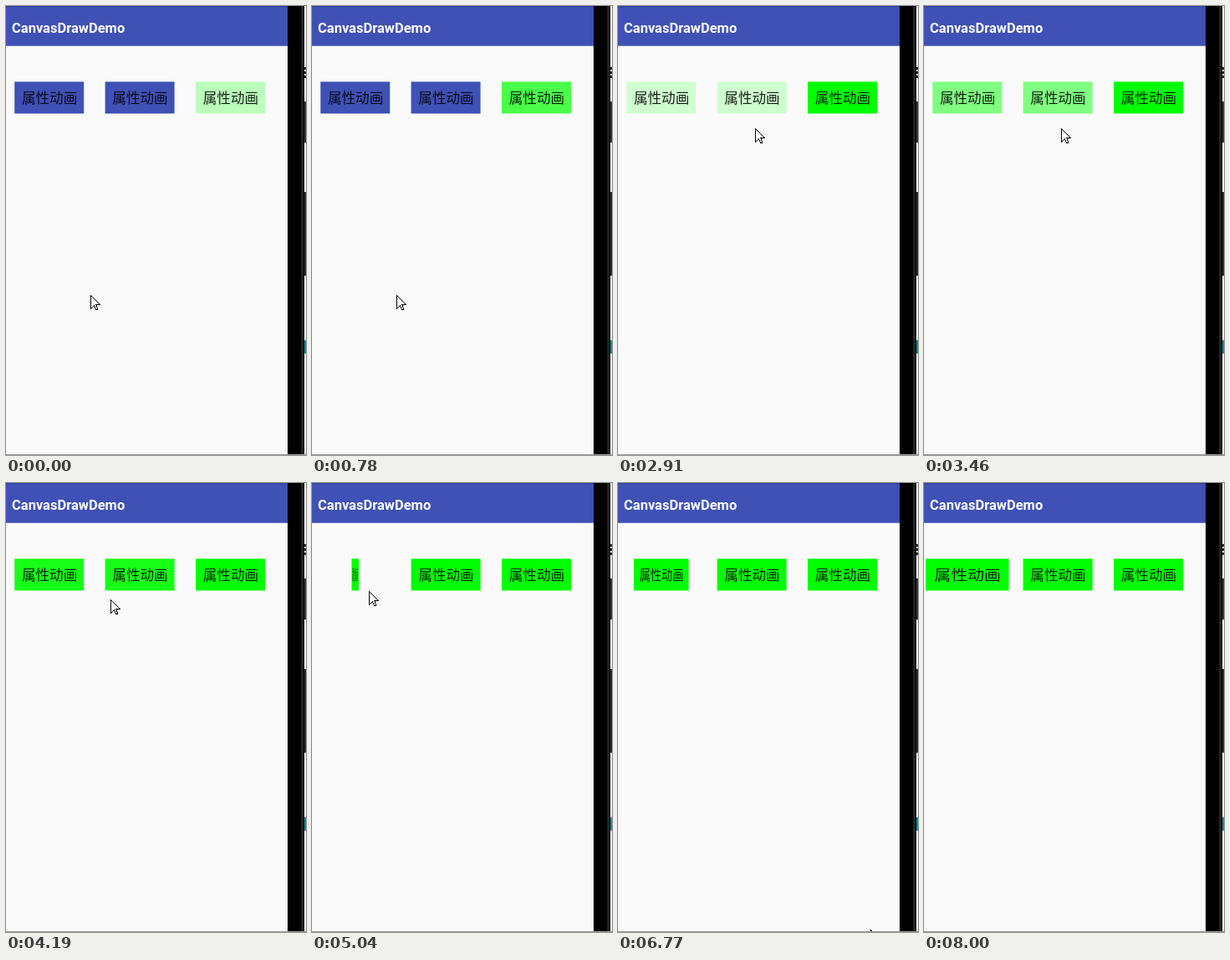
Write an HTML page that moves like this. It is 359 by 536 pixels and loops after 8650 ms.

```html
<!DOCTYPE html>
<html lang="zh-CN">
<head>
<meta charset="utf-8">
<style>
  html, body { margin: 0; width: 100%; height: 100%; overflow: hidden; background: #fafafa; }
  svg { display: block; width: 359px; height: 536px; }
  .title { font: 600 16.5px Roboto, sans-serif; fill: #fff; }
  .label { font: 400 16.6px "Noto Sans CJK SC", "Noto Sans CJK", sans-serif; text-anchor: middle; fill-opacity: .87; }
</style>
</head>
<body>
<svg viewBox="0 0 359 536">
  <rect width="359" height="536" fill="#fafafa"/>
  <rect width="337" height="47.7" fill="#3f51b5"/>
  <rect width="337" height="1.3" fill="#303f9f"/>
  <text class="title" x="7" y="31.5">CanvasDrawDemo</text>
  <g id="buttons"></g>
  <path id="cursor" d="M.5 .5V16.5L4.5 12.7 7 18 9 17 6.7 11.5H11.5Z" fill="#fff" stroke="#000" shape-rendering="crispEdges"/>
  <rect y="535" width="359" height="1" fill="#999"/>
  <rect x="337" width="20" height="535"/>
  <rect x="353" width="3" height="535" fill="#222"/>
  <g id="edge"></g>
</svg>
<script>
const LOOP = 8650;
const FADE = 1770;
const STRETCH = 3010;
const $ = id => document.getElementById(id);

function add(parent, tag, attrs, text = '') {
  const node = document.createElementNS('http://www.w3.org/2000/svg', tag);
  for (const key in attrs) node.setAttribute(key, attrs[key]);
  node.textContent = text;
  return parent.appendChild(node);
}

const buttons = [0, 1, 2].map(i => {
  const x = 10.2 + 108.4 * i;
  const group = add($('buttons'), 'g', {});
  const box = add(group, 'rect', { x, y: 90.4, width: 83, height: 38 });
  add(group, 'text', { class: 'label', x: x + 41.9, y: 115.8 }, '属性动画');
  return { group, box, center: x + 41.5 };
});

// Sliver of the window behind the emulator
const strip = (y, height, fill) => add($('edge'), 'rect', { x: 357, y, width: 2, height, fill });
strip(0, 535, '#f0f0f0');
for (let y = 73; y < 88; y += 5) strip(y, 3, '#222');
strip(114, 49, '#333');
strip(222, 100, '#2b2b2b');
strip(399, 16, '#0a8f8f');

const pointerStops = [
  { t: 920, x: 101, y: 345 },
  { t: 1470, x: 119, y: 195 },
  { t: 2010, x: 74, y: 137 },
  { t: 2670, x: 164, y: 146 },
  { t: 3600, x: 164, y: 146 },
  { t: 5040, x: 68, y: 129 },
  { t: 6100, x: 68, y: 129 },
  { t: 6770, x: 302, y: 533 },
  { t: 6920, x: 302, y: 560 },
];

const progress = (t, start, duration) => Math.min(1, Math.max(0, (t - start) / duration));
const mix = (a, b, p) => Math.round(a + (b - a) * p);

function pointerAt(t) {
  const next = pointerStops.findIndex(stop => stop.t > t);
  const to = pointerStops.at(next);
  const from = pointerStops[Math.max(0, next - 1)] ?? to;
  const a = next < 0 ? to : from;
  const p = progress(t, a.t, to.t - a.t || 1);
  return [mix(a.x, to.x, p), mix(a.y, to.y, p)];
}

function fadeToGreen(t, start) {
  const c = mix(255, 0, progress(t, start, FADE));
  return `rgb(${c},255,${c})`;
}

function render(t) {
  const blueOrFade = t < 2670 ? '#3f51b5' : fadeToGreen(t, 2580);
  buttons[0].box.setAttribute('fill', blueOrFade);
  buttons[1].box.setAttribute('fill', blueOrFade);
  buttons[2].box.setAttribute('fill', fadeToGreen(t, -475));

  // The first button snaps thin, then stretches past its own width
  const { group, center } = buttons[0];
  const scale = t < 5000 ? 1 : 1.2 * progress(t, 4785, STRETCH);
  group.setAttribute('transform', `translate(${center} 0) scale(${scale} 1) translate(${-center} 0)`);

  $('cursor').setAttribute('transform', `translate(${pointerAt(t)})`);
}

const began = performance.now();
function tick() {
  render((performance.now() - began) % LOOP);
  requestAnimationFrame(tick);
}
tick();
</script>
</body>
</html>
```
